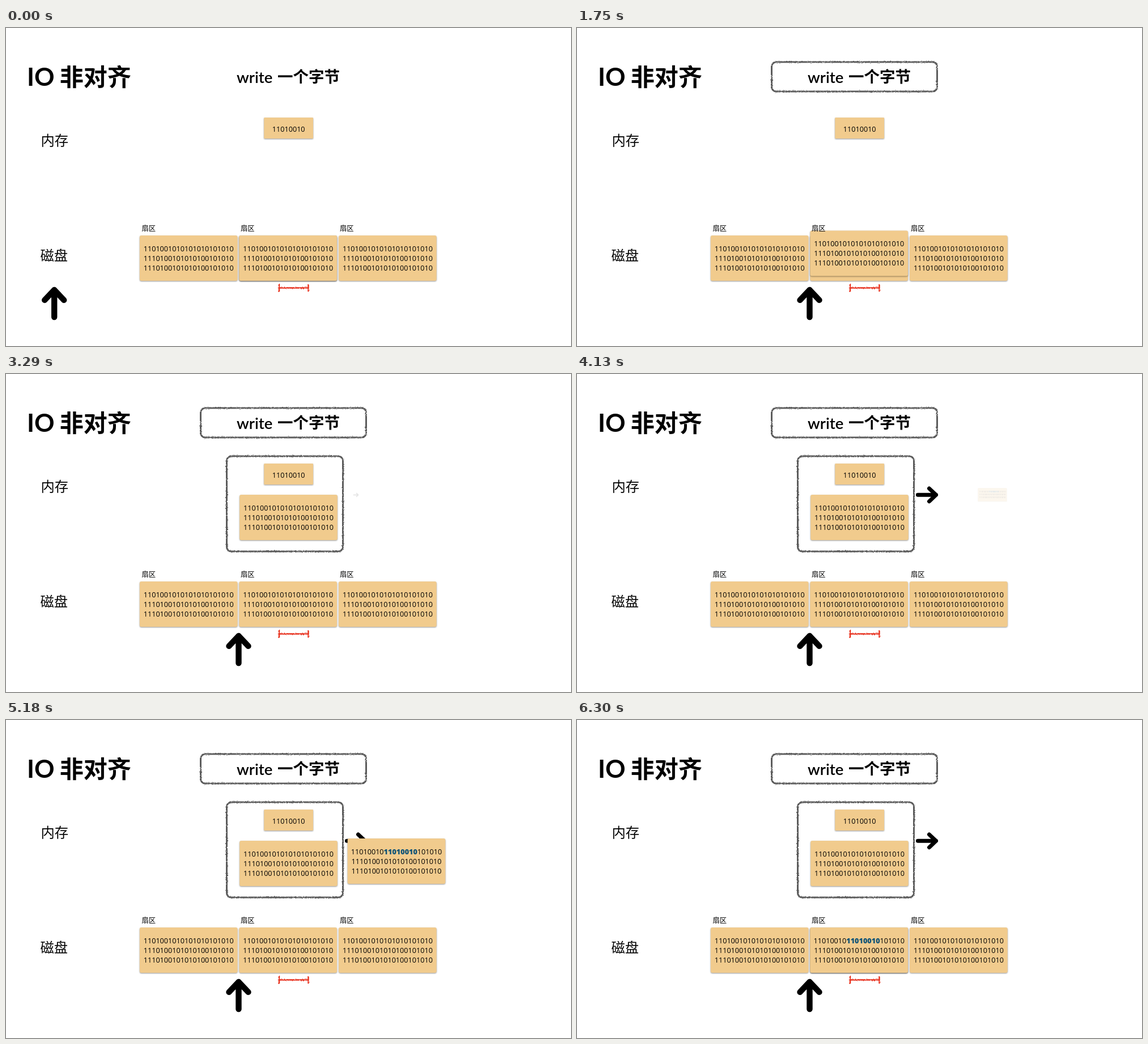
Animation of 997x561 px, one loop 6.37 s. Source, as an HTML page:

```html
<!DOCTYPE html>
<html lang="zh">
<head>
<meta charset="utf-8">
<title>IO 非对齐</title>
<style>
  html, body { margin: 0; width: 100%; height: 100%; overflow: hidden; background: #fff; }
  svg { display: block; width: 100%; height: 100%; }
  text { font-family: Lato, "Noto Sans CJK SC", "Noto Sans CJK", sans-serif; font-weight: 500; }
  .title { font-size: 42px; font-weight: 700; }
  .call { font-size: 27.5px; font-weight: 600; }
  .side { font-size: 24.3px; }
  .label { font-size: 12.3px; }
  .bits { font: 12.65px "Open Sans", "Noto Sans", sans-serif; text-anchor: middle; }
  .hot { font-weight: 800; fill: #0f5377; }
  .card { fill: #f1cb8d; filter: drop-shadow(0 1px .8px rgba(0, 0, 0, .42)); }
  .sketch { fill: none; stroke: #5c5c5c; stroke-width: 3; filter: url(#rough); }
  .arrow { fill: none; stroke: #000; stroke-width: 10.4; stroke-linecap: round; stroke-linejoin: round; }
</style>
</head>
<body>
<svg viewBox="0 0 997 561">
  <defs>
    <filter id="rough" filterUnits="userSpaceOnUse" x="0" y="0" width="997" height="561">
      <feTurbulence type="fractalNoise" baseFrequency=".45" numOctaves="2" seed="4"/>
      <feDisplacementMap in="SourceGraphic" scale="3" xChannelSelector="R" yChannelSelector="G"/>
    </filter>
    <path id="up" class="arrow" d="M0 24V-24M-17 -6L0 -24L17 -6"/>
    <rect id="plate" class="card" x="-86.3" y="-40" width="172.6" height="80" rx="3"/>
    <g id="rows">
      <text class="bits" y="4.7">1110100101010100101010</text>
      <text class="bits" y="21.9">1110100101010100101010</text>
    </g>
    <g id="sector">
      <use href="#plate"/>
      <text class="bits" y="-12.5">1101001010101010101010</text>
      <use href="#rows"/>
    </g>
  </defs>

  <text class="title" x="37" y="102" style="font-size:44px">IO</text>
  <text class="title" x="94.8" y="101.6">非对齐</text>
  <text class="call" x="407" y="96.5">write</text>
  <text class="call" x="479" y="96.3">一个字节</text>
  <text class="side" x="61.5" y="206.8">内存</text>
  <text class="side" x="60.5" y="409.7">磁盘</text>

  <rect class="card" x="455.3" y="158" width="86.7" height="37" rx="1"/>
  <text class="bits" x="498.7" y="183">11010010</text>

  <use href="#sector" x="322.2" y="406"/>
  <use href="#sector" x="497.7" y="406"/>
  <use href="#sector" x="673.4" y="406"/>
  <path class="sketch" style="stroke:#e8301f;stroke-width:2.4" d="M482 452V465M533.5 452V465M482 458.5H533.5"/>

  <use id="head" href="#up"/>
  <rect id="callBox" class="sketch" x="343.5" y="60" width="292" height="52" rx="8" pathLength="1"/>
  <rect id="memBox" class="sketch" x="389.5" y="145" width="205" height="168" rx="8" pathLength="1"/>
  <use id="next" href="#up"/>
  <use id="copy" href="#sector"/>
  <g id="merged">
    <use href="#plate"/>
    <text class="bits" y="-12.5">11010010<tspan class="hot">11010010</tspan>101010</text>
    <use href="#rows"/>
  </g>

  <text class="label" x="239.5" y="358">扇区</text>
  <text class="label" x="414" y="358">扇区</text>
  <text class="label" x="589" y="358">扇区</text>
</svg>
<script>
const LOOP = 6370, STEP = 70;
const $ = id => document.getElementById(id);
const clamp = p => Math.min(1, Math.max(0, p));
const ease = p => (1 - Math.cos(Math.PI * p)) / 2;
const mix = (a, b, p) => a + (b - a) * p;
const part = (t, start, length) => clamp((t - start) / length);
const smooth = (t, start, length) => ease(part(t, start, length));

function trace(el, p) {
  el.style.display = p > 0 ? "" : "none";
  el.style.strokeDasharray = p < 1 ? `${p} 2` : "none";
}

// Fade in while growing past full size, then settle back.
function pop(el, t, start) {
  const grow = part(t, start, 500);
  el.style.display = grow > 0 ? "" : "none";
  el.style.opacity = grow;
  return mix(.16, 1.1, grow) - .1 * smooth(t, start + 500, 250);
}

function place(el, x, y, extra = "") {
  el.setAttribute("transform", `translate(${x} ${y}) ${extra}`);
}

function draw(t) {
  trace($("callBox"), smooth(t, 0, 500));
  place($("head"), mix(85.2, 410.5, smooth(t, 546, 1000)), 486);

  const lift = smooth(t, 1598, 1000);
  place($("copy"), mix(497.7, 498.5, lift), mix(406, 253, lift));
  trace($("memBox"), smooth(t, 2642, 500));

  const size = pop($("next"), t, 3240);
  place($("next"), 617.5, 213.3, `rotate(90) scale(${size * .67})`);

  const grown = pop($("merged"), t, 4058), drop = smooth(t, 4753, 1500);
  place($("merged"), mix(733, 497.7, drop), mix(213, 406, drop), `scale(${grown})`);
}

const begin = performance.now();
function tick(now) {
  const t = Math.max(0, now - begin) % LOOP;
  draw(Math.floor(t / STEP) * STEP);
  requestAnimationFrame(tick);
}
draw(0);
requestAnimationFrame(tick);
</script>
</body>
</html>
```
